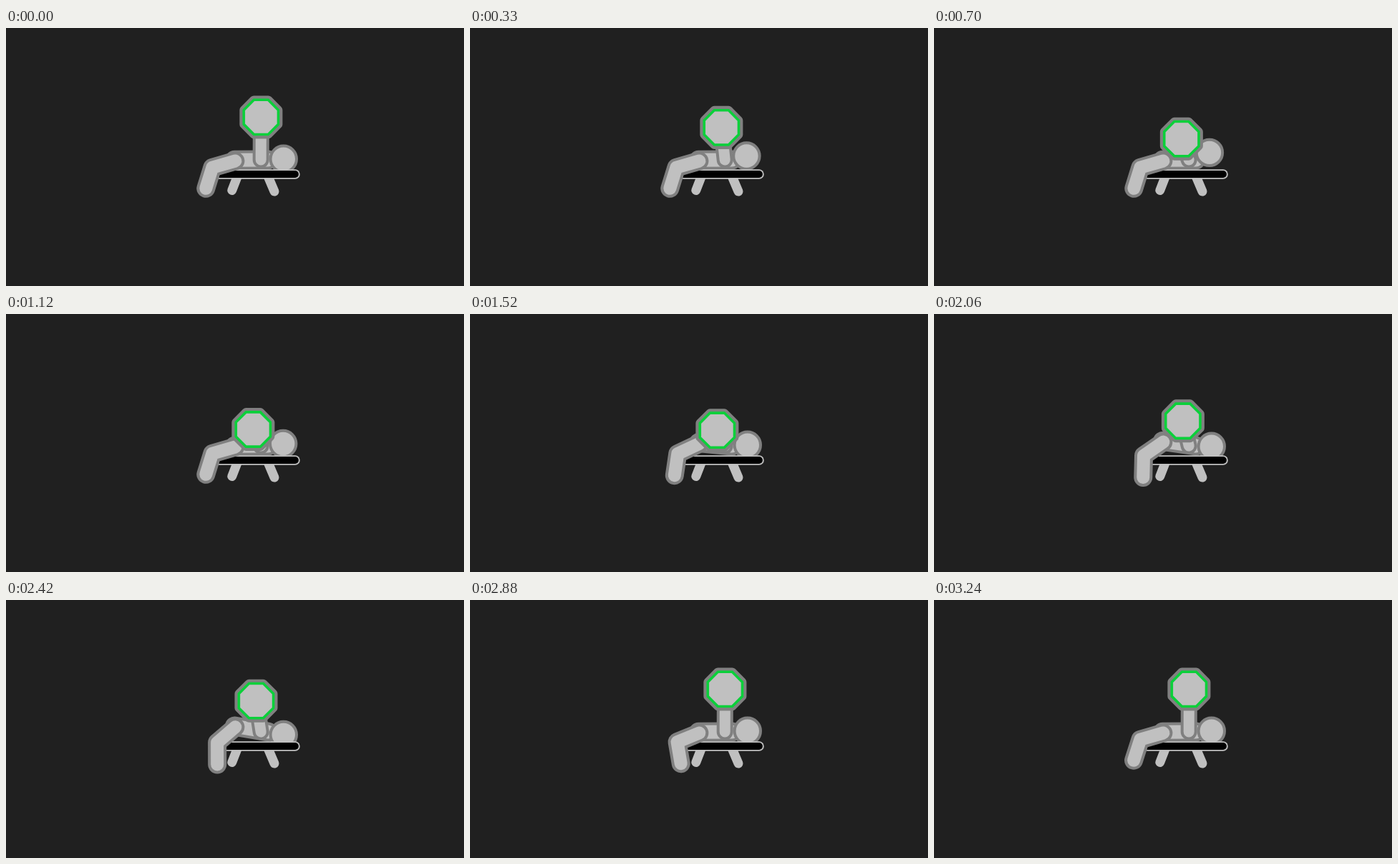
An HTML page for the animation above (3.27 s loop, 640 by 360 pixels).

```html
<!DOCTYPE html>
<html lang="en">
<head>
<meta charset="utf-8">
<title>Bench press</title>
<style>
  html, body { margin: 0; width: 100%; height: 100%; overflow: hidden; background: #202020; }
  svg { display: block; width: 100vw; height: 100vh; }
  path { fill: none; stroke-linecap: round; stroke-linejoin: round; }
  .edge { stroke: #808080; }
  .skin { stroke: #c0c0c0; }
  .rim { stroke: #0bd03a; fill: #c0c0c0; stroke-linejoin: miter; }
</style>
</head>
<body>
<svg viewBox="0 0 640 360">
  <path class="skin" stroke-width="13" d="M323 208L315.8 226.5M366.5 208L375 228"/>
  <g id="torso"></g>
  <circle id="head" r="18.2" fill="#c0c0c0" stroke="#808080" stroke-width="4"/>
  <path class="skin" stroke-width="13.6" d="M298 204H404"/>
  <path stroke="#000" stroke-width="9.8" d="M298 204H404"/>
  <g id="arm"></g>
  <g id="leg"></g>
  <g id="plate">
    <path class="edge" stroke-width="11.8"/>
    <path class="rim" stroke-width="3.6"/>
  </g>
</svg>
<script>
const LOOP = 3270, STEP = 30;
const THIGH = 33.3, SHIN = 30.5, PLATE_RADIUS = 26.1;
const shoulder = [356.2, 184], chest = [366, 184];

const byId = id => document.getElementById(id);
const ramp = (t, from, to) => Math.min(1, Math.max(0, (t - from) / (to - from)));
const place = (id, x, y) => byId(id).setAttribute("transform", `translate(${x} ${y})`);

// Point at a given length from another; 0 degrees is straight down, positive swings left.
function reach([x, y], length, degrees) {
  const angle = degrees * Math.PI / 180;
  return [x - length * Math.sin(angle), y + length * Math.cos(angle)];
}

function makeLimb(id, width) {
  const paths = [["edge", width], ["skin", width - 8]].map(([name, size]) => {
    const path = document.createElementNS("http://www.w3.org/2000/svg", "path");
    path.setAttribute("class", name);
    path.setAttribute("stroke-width", size);
    return byId(id).appendChild(path);
  });
  return (...points) => paths.forEach(path => path.setAttribute("d", "M" + points.join("L")));
}

const drawTorso = makeLimb("torso", 27);
const drawArm = makeLimb("arm", 23);
const drawLeg = makeLimb("leg", 26);

const octagon = Array.from({ length: 8 }, (_, i) => reach([0, 0], PLATE_RADIUS, 22.5 + i * 45));
for (const path of byId("plate").children) path.setAttribute("d", "M" + octagon.join("L") + "Z");

function draw(t) {
  const lower = ramp(t, 0, 720);
  const settle = ramp(t, 720, 1200);
  const tuck = ramp(t, 1200, 1520);
  const arch = ramp(t, 1500, 2420);
  const finish = ramp(t, 2420, 2850);
  const stretch = ramp(t, 2860, 3240);
  const swing = Math.sin(arch * Math.PI / 2);

  const plate = [
    356.4 - 11 * lower + 4.2 * arch + 6.8 * finish,
    124.4 + 31.6 * lower + 6.2 * settle - 22 * arch - 15.8 * finish
  ];
  const head = [
    387.8 - 3 * (lower - settle),
    182.8 - 9.3 * (lower - settle) + 5.5 * (arch * arch - finish)
  ];
  const hip = [319.5, 184.3 - 5 * tuck - 3.3 * arch + 8.3 * finish];
  const legTop = [hip[0] + 0.9, hip[1] + 1.2];
  const knee = reach(legTop, THIGH, 74 - 9.8 * tuck - 15.2 * arch + 18.4 * finish + 6.6 * stretch);
  const foot = reach(knee, SHIN, 17.3 - 9.5 * tuck - 8 * swing - 11 * finish + 29 * stretch);

  drawTorso(hip, chest);
  drawArm(shoulder, plate);
  drawLeg(legTop, knee, foot);
  place("head", ...head);
  place("plate", ...plate);
}

const start = performance.now();
function tick() {
  const t = (performance.now() - start) % LOOP;
  draw(Math.floor(t / STEP) * STEP);
  requestAnimationFrame(tick);
}
tick();
</script>
</body>
</html>
```
